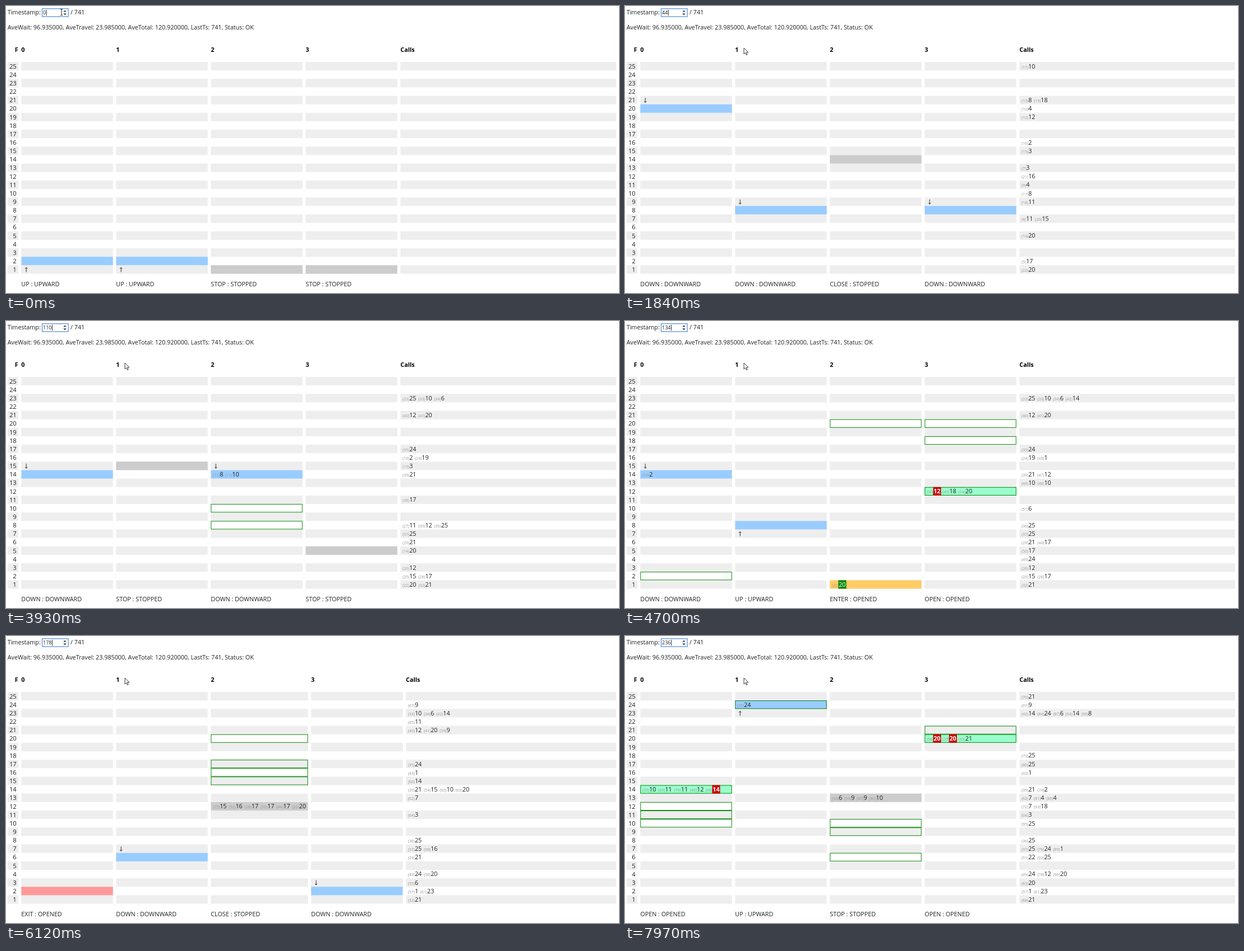
Recreate the animation shown at these times as an HTML page. Size 1093 by 513 pixels, loop 8 s.

```html
<!DOCTYPE html>
<html lang="en">
<head>
<meta charset="utf-8">
<title>Elevator simulation</title>
<style>
  html, body { margin: 0; width: 100%; height: 100%; overflow: hidden; background: #fff; }
  svg { display: block; width: 1093px; height: 513px; }
  text { font: 10.78px "Open Sans", "Noto Sans", sans-serif; fill: #222; }
  .bold { font-weight: 700; fill: #000; }
  .floor { font-size: 11.3px; text-anchor: end; }
  .id { font-size: 7.1px; fill: #999; }
  .in { font-weight: 400; fill: #fff; }
  .out { font-weight: 700; fill: #fff; }
  .field { font-size: 9px; }
  .arrow { fill: none; stroke: #333; stroke-width: 1; }
</style>
</head>
<body>
<svg viewBox="0 0 1093 513">
  <text x="2.7" y="15.4">Timestamp:</text>
  <rect x="64.5" y="4.8" width="46.6" height="14.2" fill="#fff" stroke="#5b92dc" stroke-width="1.3"/>
  <path d="M102.2 10.6l2.8-3.2 2.8 3.2zM102.2 13.2l2.8 3.2 2.8-3.2z" fill="#444"/>
  <text x="115" y="15.4">/ 741</text>
  <text x="2.7" y="42">AveWait: 96.935000, AveTravel: 23.985000, AveTotal: 120.920000, LastTs: 741, Status: OK</text>
  <g id="board"></g>
  <path id="beam" d="M-2 -5.5h1.4l.6.6.6-.6h1.4M0 -5v10M-2 5.5h1.4l.6-.6.6.6h1.4" fill="none" stroke="#222"/>
  <path id="pointer" d="M0 0v11l2.6-2.4 1.8 4 1.8-.8-1.8-3.9h3.4z" fill="#fff" stroke="#222" stroke-width=".9"/>
</svg>
<script>
const LOOP = 8000, LAST = 236, FLOORS = 25;
const TOP = 100, ROW = 15.14, LEFT = 27.3, WIDTH = 163.4, GAP = 5.6, RIGHT = 1087.8;
const DIGIT = 0.572, PAREN = 0.296, BIG = 10.78, SMALL = 7.1, PAD = 1.8;

// Playback: [ms, timestamp] anchors and runs of evenly spaced updates.
const CLOCK = [[0, 0], [70, 1], [460, 2], [1840, 44], [3160, 85], [4700, 134], [6120, 178], [7200, 211], [7970, 236]];
const RUNS = [[460, 1230], [1300, 2070], [2150, 2930], [3010, 3780], [3860, 4630],
  [4700, 5490], [5570, 6350], [6430, 7200], [7270, 7970, 9]];

// Each passenger id appears in order: [id, timestamp of the call].
const CALLS = [[1, 1], [22, 44], [32, 85], [51, 134], [68, 178], [89, 211], [96, 236]];

// Stops of each car: floor:id>destination for everyone boarding there.
const PLANS = [
  [0, "6:1>25 10:2>20 20 25 13:7>3 3 21:19>18 19:31>16 18 16 11:38>17 17 16:16>2 14:47>12 13:46>10,48>10 12 10:51>6 9:53>5 6 5 2 23:33>10 22:65>11 21:40>12,41>20,79>11 20:69>18 18 15:66>14 14"],
  [0, "8:3>23 23 7:4>11 11 20:10>4 19:12>12 12 4 15:15>3 3 23:23>25 25 6:29>21 7:68>16 14:63>20 16 18:71>20 20 21 17:35>24 24"],
  [16, "18:8>14 14 11:9>4 10:17>8 8 4 25:11>10 21:13>8 10 8 1:22>20 2:25>15,28>17 3:26>12 5:50>17 6:44>17 8:58>11 9:52>16 11 12 14:54>15 15 16 17 20 23:34>6 21:59>9 17:85>9 14:60>10 13:62>7"],
  [14, "9:6>16 16 2:5>17 7:20>15 9:18>11 11 12:21>16 15 16 17 5:14>20 8:27>11,30>12 9:45>18 11 12 16:24>19 18 19 20 1:32>21 3:55>6 4:56>20 5:75>20 6 8:77>17 11:82>13 13 17 20 21"]
];
const WAITING = "25:70>21 24:67>9 23:42>14,84>24,87>6,94>14,96>8 18:73>25 17:80>25 16:43>1 14:39>21,74>2 13:81>4,86>4 12:72>7,93>18 11:64>3 10:95>25 8:36>25 7:37>25,76>24,89>1 6:91>22,92>25 4:49>24,78>12,90>20 3:83>20 2:57>1,61>23 1:88>21";

const ACTS = {
  UP: ["UPWARD", "#9cf"], DOWN: ["DOWNWARD", "#9cf"], STOP: ["STOPPED", "#ccc"], CLOSE: ["STOPPED", "#ccc"],
  OPEN: ["OPENED", "#9fc"], EXIT: ["OPENED", "#f99"], ENTER: ["OPENED", "#fc6"]
};

function lerp(table, x) {
  let i = 1;
  while (i < table.length - 1 && x > table[i][0]) i++;
  const [[x0, y0], [x1, y1]] = [table[i - 1], table[i]];
  return y0 + (y1 - y0) * Math.min(1, (x - x0) / (x1 - x0));
}

const people = [];

function parse(plan) {
  return plan.split(" ").map(stop => {
    const [floor, list] = stop.split(":");
    const group = (list ? list.split(",") : []).map(item => {
      const [id, to] = item.split(">").map(Number);
      return { id, to, from: +floor, call: lerp(CALLS, id), gone: Infinity };
    });
    people.push(...group);
    return [+floor, group];
  });
}

// One floor per tick; a stop takes one tick for each action.
function simulate([rest, plan]) {
  const states = [];
  let floor = 1, riders = [];
  const push = (act, fresh = []) => states.push({ act, floor, riders, fresh });
  for (let i = 0; i < rest; i++) push("STOP");
  for (const [goal, group] of parse(plan)) {
    while (floor !== goal) {
      const dir = Math.sign(goal - floor);
      floor += dir;
      push(dir > 0 ? "UP" : "DOWN");
    }
    push("STOP");
    push("OPEN");
    const staying = riders.filter(p => p.to !== floor);
    if (staying.length < riders.length) {
      riders = staying;
      push("EXIT");
    }
    if (group.length) {
      group.forEach(p => p.gone = states.length);
      riders = [...riders, ...group].sort((a, b) => a.to - b.to);
      push("ENTER", group);
    }
    push("CLOSE");
  }
  return states;
}

const cars = PLANS.map(simulate);
parse(WAITING);
people.sort((a, b) => a.id - b.id);

const rowY = floor => TOP + (FLOORS - floor) * ROW;
const rect = (x, y, w, h, fill) => `<rect x="${x}" y="${y}" width="${w}" height="${h}" fill="${fill}"/>`;
const text = (x, y, s, cls = "") => `<text x="${x}" y="${y}" class="${cls}">${s}</text>`;
const idWidth = p => (2 * PAREN + String(p.id).length * DIGIT) * SMALL;
const toWidth = p => String(p.to).length * DIGIT * BIG;
const tokenWidth = p => idWidth(p) + toWidth(p) + 2 * PAD;

function tokens(list, x, floor, mark = () => "") {
  const y = rowY(floor), base = y + 11.5;
  let out = "";
  x += PAD;
  for (const p of list) {
    const cls = mark(p), numX = x + PAD + idWidth(p);
    out += text(x + PAD, base, `(${p.id})`, "id");
    if (cls) out += rect(numX - 0.8, y, toWidth(p) + 1.8, ROW, cls === "out" ? "#c00" : "#080");
    out += text(numX, base, p.to, cls);
    x += tokenWidth(p);
  }
  return out;
}

function stripes(x, w) {
  let out = "";
  for (let f = 1; f <= FLOORS; f += 2) out += rect(x, rowY(f), w, ROW, "#eee");
  return out;
}

function drawCar(state, x, w) {
  const { act, floor, riders, fresh } = state, [mode, color] = ACTS[act];
  let out = rect(x, rowY(floor), w, ROW, color);
  for (const f of new Set(riders.map(p => p.to))) {
    out += `<rect x="${x + 0.5}" y="${rowY(f) + 0.5}" width="${w - 1}" height="${ROW - 1}" fill="none" stroke="#0a8a0a"/>`;
  }
  out += tokens(riders, x, floor, p =>
    act === "OPEN" && p.to === floor ? "out" : fresh.includes(p) ? "in" : "");
  if (act === "UP" || act === "DOWN") {
    const dir = act === "UP" ? 1 : -1, mid = rowY(floor - dir) + 8;
    out += `<path class="arrow" transform="translate(${x + 8.9} ${mid}) scale(1 ${dir})" d="M0 4.4V-4M-2 -1.6L0 -4 2 -1.6"/>`;
  }
  return out + text(x, 501, `${act} : ${mode}`);
}

function drawBoard(ts) {
  let out = text(66, 15.2, ts, "field");
  out += rect(66.6 + String(ts).length * DIGIT * 9, 6.8, 0.9, 10.4, "#222");
  out += text(15.8, 82, "F", "bold") + stripes(2.7, 19.3);
  for (let f = 1; f <= FLOORS; f++) out += text(18.8, rowY(f) + 11.7, f, "floor");

  let x = LEFT;
  cars.forEach((states, i) => {
    const state = states[ts];
    const w = Math.max(WIDTH, state.riders.reduce((sum, p) => sum + tokenWidth(p), 2 * PAD));
    out += text(x, 82, i, "bold") + stripes(x, w) + drawCar(state, x, w);
    x += w + GAP;
  });

  out += text(x, 82, "Calls", "bold") + stripes(x, RIGHT - x);
  for (let f = 1; f <= FLOORS; f++) {
    out += tokens(people.filter(p => p.from === f && p.call <= ts && p.gone > ts), x, f);
  }
  document.getElementById("board").innerHTML = out;
}

const updates = [0, 70];
for (const [start, end, steps = 10] of RUNS) {
  for (let i = 0; i <= steps; i++) {
    updates.push(Math.floor((start + (end - start) * i / steps) / 10) * 10);
  }
}

const beam = document.getElementById("beam"), pointer = document.getElementById("pointer");

function drawCursor(ms) {
  const k = Math.min(1, Math.max(0, (ms - 500) / 500)), e = k * k * (3 - 2 * k);
  const x = 99 + 113 * e, y = 11 + 64 * e, inField = x < 102 && y < 19;
  beam.style.display = inField ? "" : "none";
  pointer.style.display = inField ? "none" : "";
  (inField ? beam : pointer).setAttribute("transform", `translate(${x} ${y})`);
}

let shown = -1;
const begin = performance.now();

function frame() {
  const t = (performance.now() - begin) % LOOP;
  const ms = updates.filter(u => u <= t).pop();
  if (ms !== shown) {
    shown = ms;
    drawBoard(Math.min(LAST, Math.round(lerp(CLOCK, ms))));
    drawCursor(ms);
  }
  requestAnimationFrame(frame);
}
frame();
</script>
</body>
</html>
```
